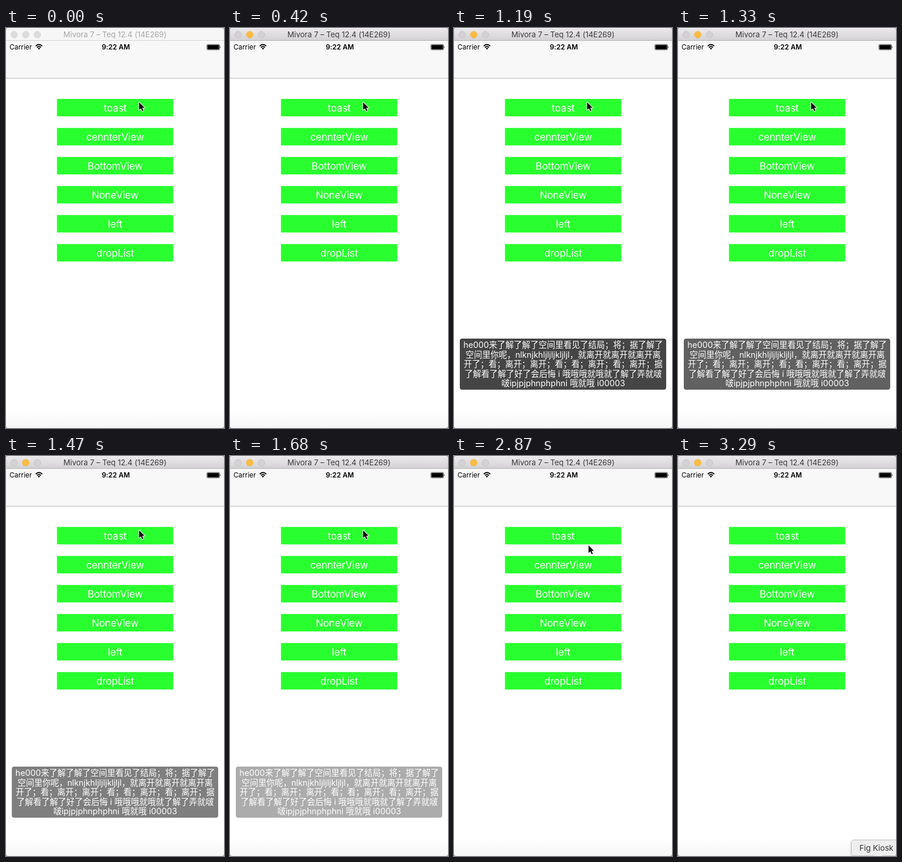
Recreate the animation shown at these times as an HTML page. Size 375 by 689 pixels, loop 3360 ms.

```html
<!DOCTYPE html>
<html lang="zh-Hans">
<head>
<meta charset="utf-8">
<title>Toast demo</title>
<style>
  html, body { margin: 0; width: 100%; height: 100%; overflow: hidden; background: #c4c4c4; }
  svg { display: block; width: 375px; height: 689px; }
  text { font-family: Inter, "Noto Sans CJK SC", "Noto Sans CJK", sans-serif; font-feature-settings: "calt" 0; }
  .mid { text-anchor: middle; }
  .title { font-size: 13px; }
  .status { font-size: 11.8px; }
  .buttons { font-size: 17px; letter-spacing: -.1px; fill: #fff; }
  .toast-text { font-size: 14.25px; fill: #fff; }
  .tip-text { font-size: 13.5px; fill: #333; }

  .active, .toast, .cursor, .tip { animation: 3360ms linear infinite; }
  .active { animation-name: activate; animation-timing-function: step-end; }
  .toast { animation-name: toast; }
  .cursor { animation-name: move; }
  .tip { animation-name: tip; animation-timing-function: step-end; }

  @keyframes activate { 0% { opacity: 0 } 10.4%, 100% { opacity: 1 } }
  @keyframes toast {
    0% { opacity: 0; animation-timing-function: step-end }
    13.99% { opacity: 1; animation-timing-function: ease-in-out }
    73.51%, 100% { opacity: 0 }
  }
  @keyframes move {
    0%, 62.5% { transform: translate(228.5px, 127px); animation-timing-function: ease-out }
    68.7%, 85% { transform: translate(230.5px, 151px); animation-timing-function: ease-in-out }
    95.8%, 100% { transform: translate(345px, 712px) }
  }
  @keyframes tip { 0% { opacity: 0 } 95.8%, 100% { opacity: 1 } }
</style>
</head>
<body>
<svg viewBox="0 0 375 689">
  <defs>
    <linearGradient id="bar" x2="0" y2="1">
      <stop stop-color="#ebe9eb"/><stop offset="1" stop-color="#d3d1d3"/>
    </linearGradient>
    <linearGradient id="floor" x2="0" y2="1">
      <stop stop-color="#fff"/><stop offset="1" stop-color="#f6f6f6"/>
    </linearGradient>
    <clipPath id="win"><rect width="375" height="689" rx="5"/></clipPath>
    <filter id="shade" x="-20%" y="-40%" width="140%" height="180%">
      <feDropShadow dx="0" dy="1" stdDeviation="2" flood-opacity=".22"/>
    </filter>
  </defs>

  <g clip-path="url(#win)">
    <rect width="375" height="689" fill="#fff"/>
    <rect y="659" width="375" height="30" fill="url(#floor)"/>

    <rect width="375" height="22" fill="#f6f6f6"/>
    <rect y="21" width="375" height="1" fill="#d4d4d4"/>
    <g fill="#dcdcdc" stroke="#d0d0d0" stroke-width=".6">
      <circle cx="14" cy="11.5" r="5.8"/><circle cx="34" cy="11.5" r="5.8"/><circle cx="54" cy="11.5" r="5.8"/>
    </g>
    <text class="title mid" x="187.5" y="16" fill="#a6a6a6">Mivora 7 – Teq 12.4 (14E269)</text>

    <g class="active">
      <rect width="375" height="22" fill="url(#bar)"/>
      <rect width="375" height="1" fill="#f4f3f4"/>
      <rect y="21" width="375" height="1" fill="#b3b1b3"/>
      <g fill="#d3d1d3" stroke="#bebcbe" stroke-width=".6">
        <circle cx="14" cy="11.5" r="5.8"/><circle cx="54" cy="11.5" r="5.8"/>
        <circle cx="34" cy="11.5" r="5.8" fill="#fdbd40" stroke="#e9ab3a"/>
      </g>
      <text class="title mid" x="187.5" y="16" fill="#3a3a3a">Mivora 7 – Teq 12.4 (14E269)</text>
    </g>

    <rect y="22" width="375" height="64" fill="#f8f8f8"/>
    <rect y="86" width="375" height="1" fill="#b9b9b9"/>
    <text class="status" x="6" y="37">Carrier</text>
    <text class="status mid" x="189" y="37" font-weight="600">9:22 AM</text>
    <g fill="none" stroke="#000" stroke-width="1.8">
      <path d="M51 31.2Q56.7 25.8 62.4 31.2M53.2 33.5Q56.7 30.3 60.2 33.5"/>
      <path d="M54.6 34.8Q56.7 33.2 58.8 34.8L56.7 37.2Z" fill="#000" stroke="none"/>
    </g>
    <rect x="345.5" y="28.25" width="22" height="9.5" rx="2" fill="none" stroke="#000" stroke-width=".6"/>
    <rect x="346.5" y="29.25" width="20" height="7.5" rx="1"/>
    <path d="M368.5 31.3q1.6 1.7 0 3.4z"/>

    <g class="buttons" id="buttons"></g>

    <g class="toast">
      <rect x="10" y="535" width="355" height="88" rx="4"/>
      <g class="toast-text" id="message"></g>
    </g>

    <g class="tip">
      <path d="M303.5 661.5H380V688.5H352L344 696L336 688.5H303.5Q298.5 688.5 298.5 683.5V666.5Q298.5 661.5 303.5 661.5Z"
        fill="#eee" stroke="#c6c6c6" filter="url(#shade)"/>
      <text class="tip-text" x="312" y="680">Fig Kiosk</text>
    </g>

    <path class="cursor" d="M.5 1V14.2L3.6 11.3L5.9 16.3L7.9 15.4L5.7 10.5H9.8Z"
      stroke="#fff" stroke-width="2.2" paint-order="stroke" stroke-linejoin="round"/>
  </g>
</svg>
<script>
  const labels = ["toast", "cennterView", "BottomView", "NoneView", "left", "dropList"];
  const lines = [
    "he000来了解了解了空间里看见了结局；将；据了解了",
    "空间里你呢，nlknjkhljljljkljljl，就离开就离开就离开离",
    "开了；看；离开；离开；看；看；离开；看；离开；据",
    "了解看了解了好了会后悔 i 哦哦哦就哦就了解了弄就啵",
    "啵ipjpjphnphphni 哦就哦 i00003"
  ];
  const centered = (s, y) => `<text class="mid" x="187.8" y="${y}">${s}</text>`;

  document.getElementById("buttons").innerHTML = labels.map((s, i) =>
    `<rect x="87.7" y="122.2" width="200" height="30" fill="#29ff2f" transform="translate(0 ${i * 50})"/>` +
    centered(s, 144 + i * 50)).join("");
  document.getElementById("message").innerHTML = lines.map((s, i) => centered(s, 551 + i * 16.6)).join("");
</script>
</body>
</html>
```
